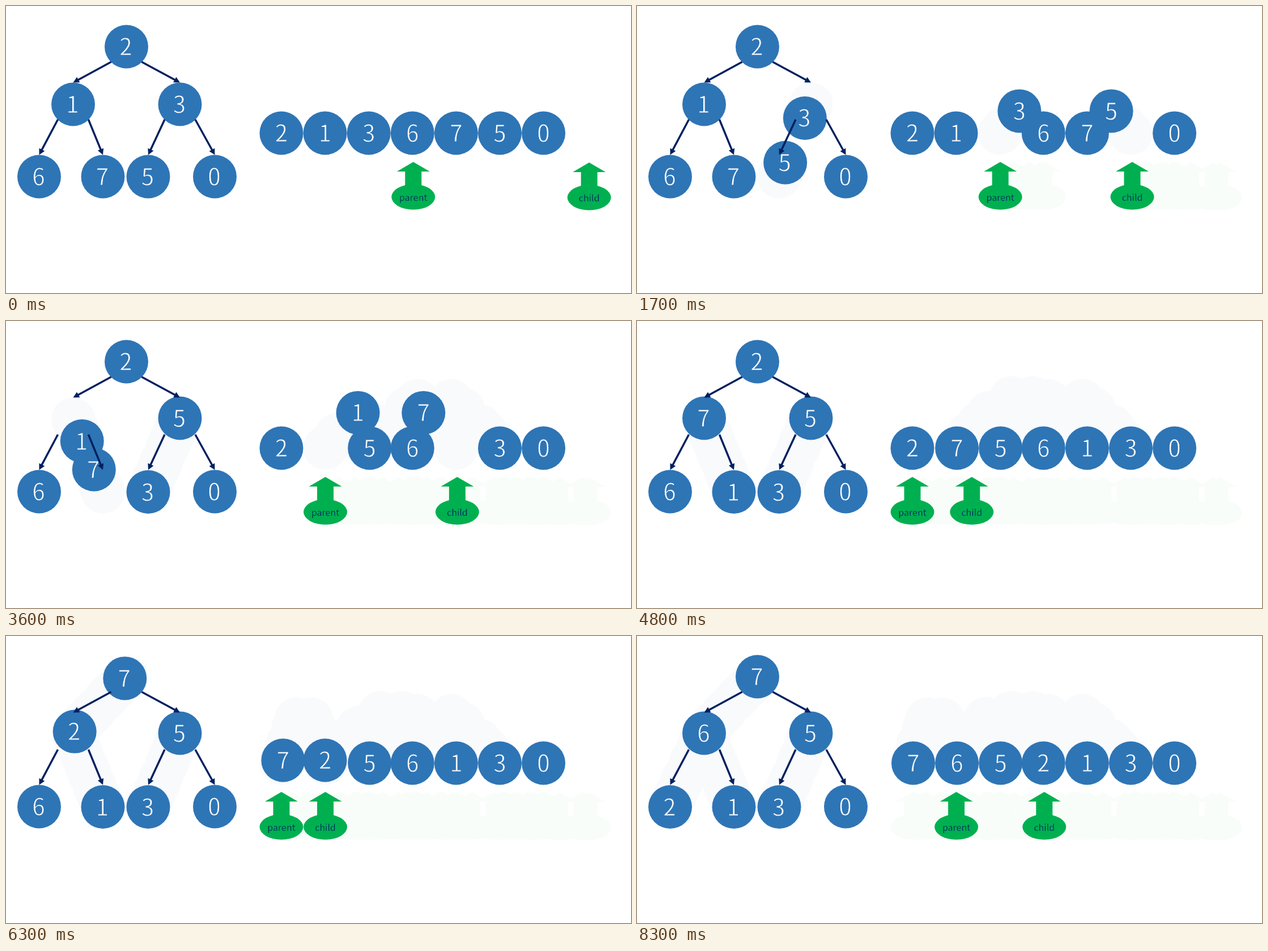
An HTML page with a canvas that plays this animation: 1103 px wide and 508 px high, repeating every 9200 ms.

```html
<!DOCTYPE html>
<html lang="en">
<head>
<meta charset="utf-8">
<title>Building a max heap</title>
<style>
  html, body { margin: 0; width: 100%; height: 100%; overflow: hidden; background: #fff; }
  canvas { display: block; }
</style>
</head>
<body>
<canvas id="stage" width="1103" height="508"></canvas>
<script>
const ctx = document.getElementById('stage').getContext('2d');
const LOOP = 9200, STEP = 100, LAST = 83;
const BLUE = '#2e75b6', GREEN = '#00b050', NAVY = '#002060';
const PALE_BLUE = '#f9fafc', PALE_GREEN = '#f8fdf9';
const FONT = '"Noto Sans CJK SC", "Noto Sans CJK JP", "Noto Sans", sans-serif';
const RADIUS = 38.5, ROW = 225, LIFT = 124;
const SWAP = 700, LEG = 510, GLIDE = 490;

const DIGITS = [2, 1, 3, 6, 7, 5, 0];
const TREE_X = [212.5, 118.5, 307, 58.5, 171, 251, 368.5];
const LEVELS = [72, 174, 302], SETTLED = [72, 172, 302.5];

// Each round: the child pointer visits some slots, then parent and child swap
const ROUNDS = [
  { start: 0, swap: 1484, visits: [5, 6, 5] },
  { start: 2200, swap: 3329, visits: [3, 4] },
  { start: 4085, swap: 5684, visits: [1, 2, 1] },
  { start: 6400, swap: 7510, visits: [4, 3] }
];

const parentOf = i => (i - 1) >> 1;
const level = i => Math.floor(Math.log2(i + 1));
const rowX = i => 486 + 77.1 * i;
const pointerX = i => 486 + 77.6 * i;
const ease = p => p < .5 ? 2 * p * p : 1 - 2 * (1 - p) ** 2;

function straight(x0, y0, x1, y1) {
  return p => [x0 + (x1 - x0) * p, y0 + (y1 - y0) * p];
}

function arc(x0, y0, x1, y1) {
  const path = document.createElementNS('http://www.w3.org/2000/svg', 'path');
  const mix = f => x0 + (x1 - x0) * f;
  path.setAttribute('d',
    `M${x0} ${y0}C${mix(.46)} ${y0 - LIFT} ${mix(.54)} ${y1 - LIFT} ${x1} ${y1}`);
  const length = path.getTotalLength();
  return p => {
    // the hop trails the tree move slightly
    const at = path.getPointAtLength(length * (p - .02 * Math.sin(2 * Math.PI * p)));
    return [at.x, at.y];
  };
}

class Track {
  constructor(x, y) { this.start = this.end = [x, y]; this.moves = []; }
  move(from, span, x, y, shape = straight) {
    this.moves.push({ from, span, path: shape(...this.end, x, y) });
    this.end = [x, y];
  }
  at(t) {
    const m = this.moves.filter(m => m.from <= t).pop();
    return m ? m.path(ease(Math.min(1, (t - m.from) / m.span))) : this.start;
  }
}

function disc(x, y, fill) {
  ctx.fillStyle = fill;
  ctx.beginPath();
  ctx.arc(x, y, RADIUS, 0, 7);
  ctx.fill();
}

function polygon(points) {
  ctx.beginPath();
  points.forEach(([x, y]) => ctx.lineTo(x, y));
  ctx.fill();
}

// A stroke in the background colour makes the letters lighter
function label(text, x, y, size, fill, back, thin) {
  ctx.font = `300 ${size}px ${FONT}`;
  ctx.textAlign = 'center';
  ctx.fillStyle = fill;
  ctx.fillText(text, x, y);
  ctx.strokeStyle = back;
  ctx.lineWidth = thin;
  ctx.strokeText(text, x, y);
}

function pointer(x, y, fill) {
  const right = [[0, 276], [29, 293], [14.5, 293], [14.5, 320]];
  const left = right.map(([dx, dy]) => [-dx, dy]).reverse();
  ctx.fillStyle = fill;
  polygon([...right, ...left].map(([dx, dy]) => [x + dx, y + dy]));
  ctx.beginPath();
  ctx.ellipse(x, y + 338, RADIUS, 22.5, 0, 0, 7);
  ctx.fill();
}

// From the lower side of a parent to the top of its child
function edge(child) {
  const p = parentOf(child), side = child % 2 ? -1 : 1;
  const x0 = TREE_X[p] + side * 27, y0 = LEVELS[level(p)] + 27;
  const x1 = TREE_X[child], y1 = LEVELS[level(child)] - RADIUS;
  ctx.save();
  ctx.translate(x1, y1);
  ctx.rotate(Math.atan2(y1 - y0, x1 - x0));
  ctx.strokeStyle = ctx.fillStyle = NAVY;
  ctx.lineWidth = 3.5;
  ctx.beginPath();
  ctx.moveTo(-Math.hypot(x1 - x0, y1 - y0), 0);
  ctx.lineTo(-8, 0);
  ctx.stroke();
  polygon([[0, 0], [-10.5, 5.5], [-10.5, -5.5]]);
  ctx.restore();
}

function ball(digit, track, dx) {
  return {
    track,
    ghost: (x, y) => disc(x, y, PALE_BLUE),
    draw(x, y) {
      disc(x, y, BLUE);
      label(digit, x + dx, y + 15, 40.5, '#fff', BLUE, 1);
    }
  };
}

function marker(text, track) {
  return {
    track,
    ghost: (x, y) => pointer(x, y, PALE_GREEN),
    draw(x, y) {
      pointer(x, y, GREEN);
      label(text, x, y + 345, 16, NAVY, GREEN, .3);
    }
  };
}

const nodes = DIGITS.map((digit, i) => ({
  digit,
  tree: new Track(TREE_X[i], LEVELS[level(i)]),
  row: new Track(rowX(i), ROW)
}));
const parent = new Track(pointerX(3), 0), child = new Track(pointerX(7), 1);

const heap = [...nodes];
for (const { start, swap, visits } of ROUNDS) {
  const c = visits[visits.length - 1], p = parentOf(c);
  parent.move(start, GLIDE, pointerX(p), 0);
  visits.forEach((v, k) => child.move(start + k * LEG, GLIDE, pointerX(v), 0));
  [heap[p], heap[c]] = [heap[c], heap[p]];
  for (const i of [p, c]) {
    heap[i].tree.move(swap, SWAP, TREE_X[i], SETTLED[level(i)]);
    heap[i].row.move(swap, SWAP, rowX(i) + (i < 3 ? 1.5 : 0), ROW, arc);
  }
}

const items = [
  ...nodes.map(n => ball(n.digit, n.tree, -1)),
  ...nodes.map(n => ball(n.digit, n.row, 0)),
  marker('parent', parent),
  marker('child', child)
];
for (const item of items) {
  item.spots = Array.from({ length: LAST + 1 }, (_, k) => item.track.at(k * STEP));
}

function render(step) {
  ctx.fillStyle = '#fff';
  ctx.fillRect(0, 0, 1103, 508);
  // Faint trail left by earlier positions
  for (const { spots, ghost } of items) {
    for (let k = 0; k < step; k++) {
      const [x, y] = spots[k], [nx, ny] = spots[k + 1];
      if (x !== nx || y !== ny) ghost(x, y);
    }
  }
  for (const { spots, draw } of items) draw(...spots[step]);
  for (let i = 1; i < DIGITS.length; i++) edge(i);
}

let shown = -1;
function tick() {
  const step = Math.min(LAST, Math.floor(performance.now() % LOOP / STEP));
  if (step !== shown) render(shown = step);
  requestAnimationFrame(tick);
}
tick();
</script>
</body>
</html>
```
